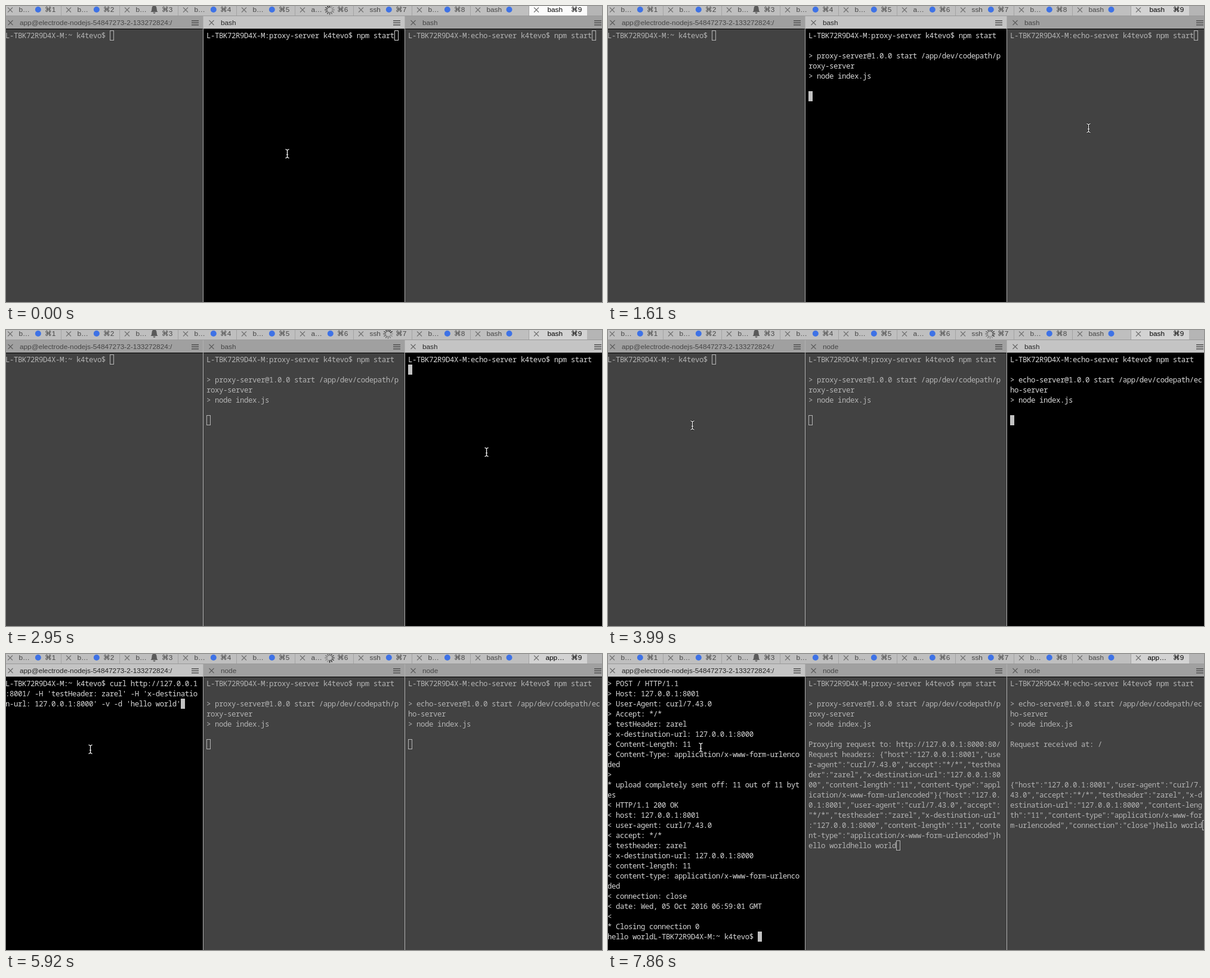
Animation, 999 px wide and 497 px high, one loop 8000 ms. Source, as an HTML page with a canvas:

```html
<!DOCTYPE html>
<html lang="en">
<head>
<meta charset="utf-8">
<title>Three terminal panes</title>
<style>
html, body { margin: 0; width: 100%; height: 100%; overflow: hidden; background: #000; }
canvas { display: block; }
</style>
</head>
<body>
<canvas id="stage" width="999" height="497"></canvas>
<script>
const ctx = document.getElementById('stage').getContext('2d');
const LOOP = 8000, STEP = 150, COLS = 46, ROWS = 26, CHAR = 7, LINE = 17;
const MONO_SIZE = 12.4;
const MONO = MONO_SIZE + 'px "Noto Sans Mono", "DejaVu Sans Mono", monospace';
const UI = '11.8px "Liberation Sans", "DejaVu Sans", sans-serif';

// Moments at which the session changes, in ms
const T = {
  focus: 150, proxyEnter: 450, proxyOut: 900, toEcho: 1910,
  echoEnter: 2510, proxyTitle: 2960, echoOut: 3110, toShell: 4140,
  command: 4740, send: 6820
};

// Spinner periods: [from, to, tab index]
const BUSY = [[0, 1610, 5], [2510, 4590, 6], [5330, 7260, 5]];

// Pointer path: [time, x, y]
const PATH = [
  [860, 471, 248], [1010, 488, 246], [1160, 572, 235], [1310, 705, 216], [1460, 795, 206],
  [1610, 805, 205], [2960, 805, 205], [3110, 690, 196], [3260, 440, 180], [3410, 190, 168],
  [3540, 111, 163], [3690, 126, 161], [3840, 141, 160], [7859, 141, 160], [7860, 155, 157]
];

const prompt = dir => `L-TBK72R9D4X-M:${dir} k4tevo$ `;
const startLog = name =>
  `\n\n> ${name}@1.0.0 start /app/dev/codepath/${name}\n> node index.js\n\n`;

const headers = '{"host":"127.0.0.1:8001","user-agent":"curl/7.43.0","accept":"*/*",' +
  '"testheader":"zarel","x-destination-url":"127.0.0.1:8000","content-length":"11",' +
  '"content-type":"application/x-www-form-urlencoded"';

const curl = "curl http://127.0.0.1:8001/ -H 'testHeader: zarel' " +
  "-H 'x-destination-url: 127.0.0.1:8000' -v -d 'hello world'";

const reply = `
> POST / HTTP/1.1
> Host: 127.0.0.1:8001
> User-Agent: curl/7.43.0
> Accept: */*
> testHeader: zarel
> x-destination-url: 127.0.0.1:8000
> Content-Length: 11
> Content-Type: application/x-www-form-urlencoded
>
* upload completely sent off: 11 out of 11 bytes
< HTTP/1.1 200 OK
< host: 127.0.0.1:8001
< user-agent: curl/7.43.0
< accept: */*
< testheader: zarel
< x-destination-url: 127.0.0.1:8000
< content-length: 11
< content-type: application/x-www-form-urlencoded
< connection: close
< date: Wed, 05 Oct 2016 06:59:01 GMT
<
* Closing connection 0
hello world`;

function shellText(t) {
  let s = prompt('~');
  if (t >= T.command) s += curl;
  if (t >= T.send) s += reply + prompt('~');
  return s;
}

function serverText(t, name, enter, out, result) {
  let s = prompt(name) + 'npm start';
  if (t >= out) s += startLog(name);
  else if (t >= enter) s += '\n';
  if (t >= T.send) s += result;
  return s;
}

const proxyResult = 'Proxying request to: http://127.0.0.1:8000:80/\n' +
  `Request headers: ${headers}}${headers}}hello worldhello world`;
const echoResult = `Request received at: /\n\n\n\n${headers},"connection":"close"}hello world`;

function wrap(text) {
  const rows = [];
  for (const line of text.split('\n')) {
    for (let i = 0; i === 0 || i < line.length; i += COLS) rows.push(line.slice(i, i + COLS));
  }
  return rows.slice(-ROWS);
}

function rect(color, x, y, w, h) {
  ctx.fillStyle = color;
  ctx.fillRect(x, y, w, h);
}

function label(text, x, y, color) {
  ctx.font = UI;
  ctx.letterSpacing = '0px';
  ctx.fillStyle = color;
  ctx.fillText(text, x, y);
}

function stroke(color, width, points) {
  ctx.strokeStyle = color;
  ctx.lineWidth = width;
  ctx.beginPath();
  for (const [x1, y1, x2, y2] of points) {
    ctx.moveTo(x1, y1);
    ctx.lineTo(x2, y2);
  }
  ctx.stroke();
}

function closeIcon(x, y, color) {
  stroke(color, 1.1, [[x - 4, y - 4, x + 4, y + 4], [x - 4, y + 4, x + 4, y - 4]]);
}

function dot(x, y) {
  ctx.fillStyle = '#3e72e6';
  ctx.beginPath();
  ctx.arc(x, y, 5, 0, 7);
  ctx.fill();
}

function bell(x, y) {
  ctx.fillStyle = '#5a5a5a';
  ctx.beginPath();
  ctx.moveTo(x - 6, y + 4);
  ctx.quadraticCurveTo(x - 4, y + 2, x - 4, y - 2);
  ctx.bezierCurveTo(x - 4, y - 8, x + 4, y - 8, x + 4, y - 2);
  ctx.quadraticCurveTo(x + 4, y + 2, x + 6, y + 4);
  ctx.fill();
  ctx.beginPath();
  ctx.arc(x, y + 4.8, 2, 0, Math.PI);
  ctx.fill();
}

function spinner(x, y, t) {
  const lead = Math.floor(t / STEP) * 2;
  for (let i = 0; i < 12; i++) {
    const age = ((lead - i) % 12 + 12) % 12;
    const a = i * Math.PI / 6, sx = Math.sin(a), sy = -Math.cos(a);
    stroke(`rgba(40,40,40,${0.95 - age * 0.06})`, 1.6,
      [[x + sx * 3.8, y + sy * 3.8, x + sx * 8.3, y + sy * 8.3]]);
  }
}

function drawTabs(t) {
  const names = ['b…', 'b…', 'b…', 'b…', 'b…', 'a…', 'ssh', 'b…', 'bash'];
  const busy = BUSY.find(([from, to]) => t >= from && t < to);
  rect('#bfbfbf', 0, 0, 974, 16);
  rect('#b5b5b5', 974, 0, 25, 16);
  names.forEach((name, i) => {
    const x = i * 98;
    closeIcon(x + 7, 6.5, '#707070');
    label(name, x + 21.5, 10, '#454545');
    if (busy && busy[2] === i) spinner(x + 52.5, 6.5, t);
    else if (i === 2) bell(x + 52.5, 6);
    else dot(x + (i === 8 ? 59.5 : 53.8), 6);
    if (i < 8) label('⌘' + (i + 1), x + 65, 10, '#454545');
    rect('#a3a3a3', 92 + 98 * i, 0, 1, 16);
  });
  rect(t < T.focus ? '#fbfbfb' : '#d3d3d3', 877, 0, 97, 16);
  closeIcon(889, 6.5, '#707070');
  if (t < T.toShell) label('bash', 907.5, 10, '#000');
  else label('app…', 904.5, 10, '#000');
  label('⌘9', 947, 10, '#000');
  rect('#999', 0, 16, 999, 1);
}

function drawText(rows, x, color) {
  ctx.font = MONO;
  ctx.letterSpacing = CHAR - MONO_SIZE * 0.6 + 'px';
  ctx.fillStyle = color;
  rows.forEach((row, i) => ctx.fillText(row, x, 54 + i * LINE));
}

function drawPane(x, width, textX, menuX, title, text, active, focused) {
  const ink = active ? '#d8d8d8' : '#b4b4b4';
  rect(active ? '#c4c4c4' : '#a0a0a0', x, 17, width, 21);
  closeIcon(x + (x ? 13.5 : 7.5), 28, active ? '#666' : '#5c5c5c');
  label(title, x + (x ? 29 : 23), 32, active ? '#262626' : '#454545');
  for (const y of [24, 27.5, 31]) rect('#505050', menuX, y, 12, 1.5);
  rect('#000', x, 38, width, 1);
  rect(active ? '#000' : '#424242', x, 39, width, 458);

  const rows = wrap(text);
  drawText(rows, textX, ink);
  const last = rows.length - 1;
  const cx = textX + rows[last].length * CHAR, cy = 41 + last * LINE;
  if (active && focused) {
    rect('#c2c2c2', cx, cy, CHAR, LINE);
  } else {
    ctx.strokeStyle = ink;
    ctx.lineWidth = 1;
    ctx.strokeRect(cx + 0.5, cy + 0.5, CHAR - 1, LINE - 1);
  }
}

function pointerAt(t) {
  const next = PATH.findIndex(p => p[0] > t);
  if (next === 0) return PATH[0].slice(1);
  if (next < 0) return PATH[PATH.length - 1].slice(1);
  const [t0, x0, y0] = PATH[next - 1], [t1, x1, y1] = PATH[next];
  const k = (t - t0) / (t1 - t0);
  return [x0 + (x1 - x0) * k, y0 + (y1 - y0) * k];
}

function drawPointer(x, y) {
  x = Math.round(x) + 0.5;
  y = Math.round(y);
  const beam = [
    [x, y - 6, x, y + 6], [x - 1.5, y + 1.5, x + 1.5, y + 1.5],
    [x, y - 6, x - 3, y - 7.5], [x, y - 6, x + 3, y - 7.5],
    [x, y + 6, x - 3, y + 7.5], [x, y + 6, x + 3, y + 7.5]
  ];
  stroke('#111', 2.6, beam);
  stroke('#fff', 1.2, beam);
}

function draw(t) {
  const active = t < T.toEcho ? 1 : t < T.toShell ? 2 : 0;
  const focused = t >= T.focus;
  drawTabs(t);
  drawPane(0, 330, -1, 311, 'app@electrode-nodejs-54847273-2-133272824:/',
    shellText(t), active === 0, focused);
  drawPane(331, 338, 336, 649, t < T.proxyTitle ? 'bash' : 'node',
    serverText(t, 'proxy-server', T.proxyEnter, T.proxyOut, proxyResult), active === 1, focused);
  drawPane(669, 330, 674, 986, t < T.toShell ? 'bash' : 'node',
    serverText(t, 'echo-server', T.echoEnter, T.echoOut, echoResult), active === 2, focused);
  for (const x of [330, 668]) rect('#b0b0b0', x, 17, 1, 480);
  drawPointer(...pointerAt(t));
}

const begin = performance.now();
function tick() {
  draw((performance.now() - begin) % LOOP);
  requestAnimationFrame(tick);
}
tick();
</script>
</body>
</html>
```
